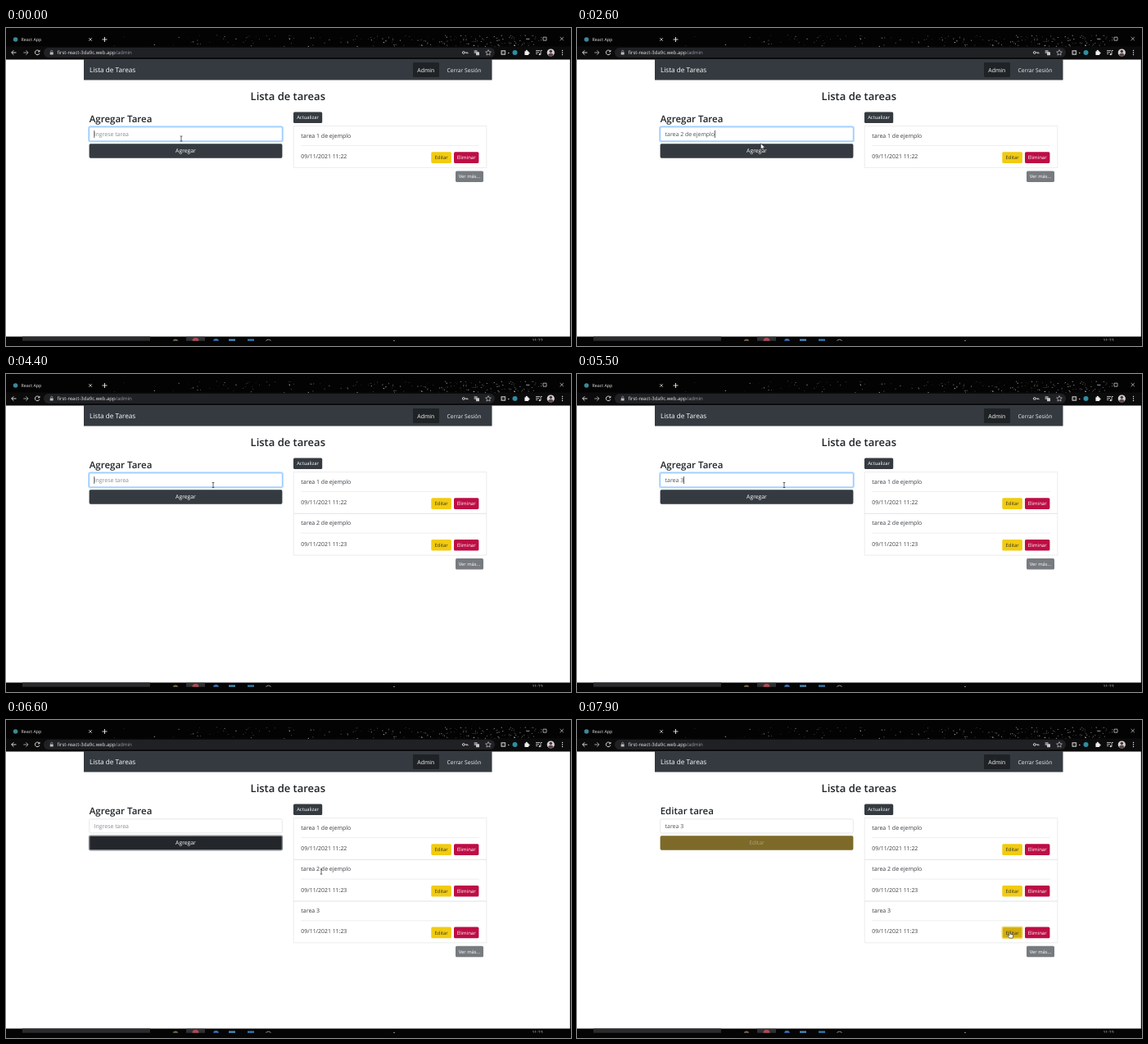
An HTML page for the animation above (8 s loop, 690 px wide and 388 px high).

```html
<!DOCTYPE html>
<html lang="es">
<head>
<meta charset="utf-8">
<title>Lista de tareas</title>
<style>
html, body { margin: 0; width: 100%; height: 100%; overflow: hidden; background: #fff; }
svg { display: block; width: 100%; height: 100%; }
text { font-family: "Open Sans", "Noto Sans", sans-serif; white-space: pre; text-rendering: geometricPrecision; }
</style>
</head>
<body>
<svg id="stage" viewBox="0 0 690 388"></svg>
<script>
const LOOP = 8000, ROW = 50.7;
const INK = '#373b40', DARK = '#343a40', PRESSED = '#23272b', LINE = '#e6e7e8';
const stage = document.getElementById('stage');

function add(tag, attrs, parent = stage) {
  const el = document.createElementNS('http://www.w3.org/2000/svg', tag);
  set(el, attrs);
  parent.appendChild(el);
  return el;
}
function set(el, attrs) {
  for (const k in attrs) el.setAttribute(k, attrs[k]);
}
const group = (parent = stage) => add('g', {}, parent);
const rect = (x, y, width, height, fill, rx = 0, parent = stage) =>
  add('rect', { x, y, width, height, fill, rx }, parent);
const dot = (cx, cy, r, fill, parent = stage) => add('circle', { cx, cy, r, fill }, parent);
const line = (d, stroke, w = 1, parent = stage) =>
  add('path', { d, stroke, 'stroke-width': w, fill: 'none' }, parent);
function label(x, y, str, size, fill, anchor = 'start', parent = stage, weight = 400) {
  const el = add('text', { x, y, fill, 'font-size': size, 'text-anchor': anchor, 'font-weight': weight }, parent);
  el.textContent = str;
  return el;
}
function button(x, y, w, h, str, size, fill, ink = '#fff', parent = stage) {
  const box = rect(x, y, w, h, fill, 1.6, parent);
  const text = label(x + w / 2, y + h / 2 + size * 0.36, str, size, ink, 'middle', parent);
  return { box, text };
}
const show = (el, on) => el.setAttribute('visibility', on ? 'visible' : 'hidden');

function drawBrowser() {
  rect(0, 0, 690, 38.3, '#030303');
  rect(0, 22.5, 690, 15.8, '#0b0b0c');
  rect(46, 24, 551, 12, '#202124', 6);

  // starry theme, denser to the right
  let seed = 7;
  const rnd = () => (seed = (seed * 16807) % 2147483647) / 2147483647;
  for (let i = 0; i < 210; i++) {
    const x = 130 + 525 * Math.pow(rnd(), 0.55), y = 8.5 + rnd() * 14, s = 0.4 + rnd() * 0.6;
    rect(x, y, s, s, '#fff').setAttribute('opacity', 0.3 + rnd() * 0.6);
  }

  dot(11.6, 14, 2.8, '#3f8796');
  label(18.5, 16, 'React App', 5.3, '#e4e4e4');
  line('M101.3 12.2l3.6 3.6m0-3.6l-3.6 3.6', '#ddd', 0.8);
  line('M117.5 14h6m-3-3v6', '#eee', 0.9);
  line('M635 13.3h4.5', '#ccc', 0.7);
  line('M656 11.2h4v4h-4z', '#ddd', 0.7);
  line('M676.6 11l4.2 4.2m0-4.2l-4.2 4.2', '#ddd', 0.7);

  line('M12.5 30H6.8m2.6-2.7L6.7 30l2.7 2.7', '#eee', 0.9);
  line('M21.3 30H27m-2.6-2.7L27.1 30l-2.7 2.7', '#aaa', 0.9);
  line('M40.6 28.3a2.8 2.8 0 1 0 .3 2.6m.1-4v2h-2', '#eee', 0.9);
  rect(53.7, 29.4, 4, 3.2, '#bbb', 0.4);
  line('M54.6 29.5v-1.1a1.1 1.1 0 0 1 2.2 0v1.1', '#bbb', 0.6);
  const url = label(62.5, 32.2, '', 6, '#e8eaed');
  add('tspan', {}, url).textContent = 'first-react-3da9c.web.app';
  add('tspan', { fill: '#9aa0a6' }, url).textContent = '/admin';

  add('circle', { cx: 558.8, cy: 30, r: 1.4, fill: 'none', stroke: '#ccc' });
  line('M560.3 30h3.7v1.3m-1.6-1.3v1.2', '#ccc', 0.9);
  rect(571.6, 27, 4, 4, '#888', 0.5);
  rect(574, 29.3, 4, 4, '#c8c8c8', 0.5);
  line('M589 26.6l1 2.2 2.4.3-1.8 1.6.5 2.4-2.1-1.2-2.1 1.2.5-2.4-1.8-1.6 2.4-.3z', '#ccc', 0.7);
  rect(604.3, 27, 6, 6, '#9a9a9a', 1);
  dot(607.3, 30, 1.7, '#222');
  dot(613.8, 30.5, 0.7, '#ddd');
  dot(621.5, 30, 3, '#2f8ea3');
  rect(633.4, 28.2, 4.8, 4.8, '#f0f0f0', 0.6);
  dot(635.8, 27.8, 1.1, '#f0f0f0');
  dot(638.5, 30.6, 1.1, '#f0f0f0');
  line('M647 27.5h5m-5 2h4m-4 2h2.4m3.6 1v-5h1.8', '#ddd', 0.8);
  dot(651.8, 32.2, 1.1, '#ddd');
  dot(665.3, 30, 4.6, '#d9d2d2');
  dot(665.3, 28.6, 1.8, '#453a3c');
  add('path', { d: 'M661.9 33a3.5 3 0 0 1 6.8 0a4.6 4.6 0 0 1-6.8 0z', fill: '#5b4548' });
  for (const y of [27.5, 30, 32.5]) dot(679.5, y, 0.7, '#eee');
}

function drawTaskbar() {
  rect(0, 376.5, 690, 11.5, '#050506');
  rect(20, 376.5, 156, 5.2, '#2b2b2d');
  const clip = add('clipPath', { id: 'bar' });
  rect(0, 376.5, 690, 5.3, '#000', 0, clip);
  const bar = add('g', { 'clip-path': 'url(#bar)' });
  rect(220, 376.5, 23, 6, '#303033', 0, bar);
  dot(207, 383, 3.4, '#7d6848', bar);
  dot(231.5, 382, 4, '#b04a55', bar);
  dot(256.5, 382.4, 3.4, '#3973b5', bar);
  rect(272, 379.5, 8, 5, '#4b91b8', 0, bar);
  rect(295, 379.5, 8, 5, '#337fb0', 0, bar);
  add('circle', { cx: 320.5, cy: 383.5, r: 3.4, fill: 'none', stroke: '#888' }, bar);
  rect(473, 381, 2, 1, '#aaa', 0, bar);
  return label(649, 382.6, '', 5.2, '#ddd', 'middle', bar);
}

function drawPage() {
  rect(95, 38.3, 498.5, 25.2, DARK);
  label(102, 54.2, 'Lista de Tareas', 8.2, '#fff');
  rect(497, 42, 32, 18, '#1f2326', 1);
  label(512.8, 53.6, 'Admin', 6.9, '#fff', 'middle');
  label(559.5, 53.6, 'Cerrar Sesión', 6.7, '#f0f0f0', 'middle');
  label(344.3, 88.3, 'Lista de tareas', 13, '#212529', 'middle', stage, 600);
  button(351, 102.4, 35.2, 13.6, 'Actualizar', 5.9, DARK);
}

function drawTask(i, name, time) {
  const g = add('g', { transform: `translate(0 ${i * ROW})` });
  line('M351.2 119.6V170.4H586.8V119.6Z', LINE, 0.8, g);
  line('M360 143.4H578', LINE, 0.7, g);
  label(360.3, 133.5, name, 7, INK, 'start', g);
  label(360.3, 159.1, time, 6.9, INK, 'start', g);
  const edit = button(519.3, 151.2, 24.6, 13.7, 'Editar', 5.9, '#f1cb12', '#3a3518', g);
  button(547, 151.2, 30.4, 13.7, 'Eliminar', 6, '#bd0d45', '#fff', g);
  return { g, edit };
}

rect(0, 0, 690, 388, '#fff');
drawPage();
drawBrowser();
const clock = drawTaskbar();
rect(688.8, 38, 1.2, 339, '#050506');

const heading = label(101.7, 114.7, '', 11.5, '#212529', 'start', stage, 600);
const glow = add('rect', { x: 101, y: 120.2, width: 237, height: 18.4, rx: 2, fill: 'none', stroke: '#bfdeff', 'stroke-width': 2 });
const field = add('rect', { x: 101.7, y: 120.9, width: 235.6, height: 17, rx: 1.5, fill: '#fff', 'stroke-width': 0.8 });
const entry = label(107.6, 132.4, '', 6.95, INK);
const caret = rect(107.5, 125, 0.7, 9, '#222');
const submit = button(101.6, 141.3, 235.8, 17.4, 'Agregar', 6.8, DARK);
const tasks = [
  drawTask(0, 'tarea 1 de ejemplo', '09/11/2021 11:22'),
  drawTask(1, 'tarea 2 de ejemplo', '09/11/2021 11:23'),
  drawTask(2, 'tarea 3', '09/11/2021 11:23')
];
const more = group();
button(549, 174.4, 34, 13.5, 'Ver más...', 5.8, '#777b7f', '#fff', more);

// pointer shapes, each with its hot spot at 0,0
const pointer = group();
const beam = line('M-1.3-3h2.6M-1.3 3h2.6M0-3v6', '#333', 0.75, pointer);
const arrow = add('path', { d: 'M0 0v7.2l1.7-1.5 1.2 2.6 1-.5-1.1-2.5h2.4z', fill: '#fff', stroke: '#111', 'stroke-width': 0.5 }, pointer);
const hand = add('path', {
  d: 'M-.7.2q.7-.7 1.3 0v3l3 .7q.8.3.7 1.2l-.6 3h-4L-2.9 5q.2-1 1.1-.6l1.1 1z',
  fill: '#fff', stroke: '#222', 'stroke-width': 0.6
}, pointer);

// time, x, y
const path = [
  [0, 214, 135], [2400, 214, 135], [3000, 254, 157], [3700, 254, 157],
  [4200, 253, 135.5], [5800, 253, 135.5], [6000, 256, 151], [6300, 256, 151],
  [6600, 385, 185], [7500, 528.5, 258], [LOOP, 528.5, 258]
];
function pointerAt(t) {
  const i = path.findIndex((p, n) => n && t <= p[0]);
  const [t0, x0, y0] = path[i - 1], [t1, x1, y1] = path[i];
  const u = (t - t0) / (t1 - t0), e = u * u * (3 - 2 * u);
  return [x0 + (x1 - x0) * e, y0 + (y1 - y0) * e];
}
const inside = (x, y, l, t, r, b) => x >= l && x <= r && y >= t && y <= b;

function typed(t) {
  const keys = (str, from) => str.slice(0, Math.max(0, Math.floor((t - from) / 100) + 1));
  if (t < 3500) return keys('tarea 2 de ejemplo', 500);
  if (t < 6400) return keys('tarea 3', 4900);
  return t < 7900 ? '' : 'tarea 3';
}
function caretOn(t) {
  const start = t < 500 ? 0 : t < 2200 ? t : t < 3200 ? 2200 : t < 4900 ? 4200 : t < 5500 ? t : 5500;
  return (t - start) % 1000 < 500;
}

function render(t) {
  const editing = t >= 7900;
  const focused = t < 3200 || (t >= 4200 && t < 6100);
  const pressed = (t >= 3200 && t < 4200) || (t >= 6100 && t < 7700);
  const [x, y] = pointerAt(t);
  const overSubmit = inside(x, y, 101, 141, 338, 159);
  const overEdit = inside(x, y, 519, 252, 544, 267);
  const overText = inside(x, y, 101, 120, 338, 138.5) || inside(x, y, 360, 177, 420, 188);

  clock.textContent = t < 1000 ? '11:22' : '11:23';
  heading.textContent = editing ? 'Editar tarea' : 'Agregar Tarea';

  const str = typed(t);
  entry.textContent = str || 'Ingrese tarea';
  entry.setAttribute('fill', str ? '#495057' : '#858b91');
  show(glow, focused);
  field.setAttribute('stroke', focused ? '#80bdff' : '#e0e2e4');
  show(caret, focused && caretOn(t));
  caret.setAttribute('x', 107.5 + (str ? entry.getComputedTextLength() : 0));

  set(submit.box, {
    fill: editing ? '#7d6a28' : pressed || overSubmit ? PRESSED : DARK,
    stroke: pressed ? '#85898d' : 'none',
    'stroke-width': 1.5
  });
  submit.text.textContent = editing ? 'Editar' : 'Agregar';
  submit.text.setAttribute('fill', editing ? '#aaa07a' : '#fff');

  const count = t < 3500 ? 1 : t < 6400 ? 2 : 3;
  tasks.forEach((task, i) => show(task.g, i < count));
  more.setAttribute('transform', `translate(0 ${(count - 1) * ROW})`);
  set(tasks[2].edit.box, {
    fill: overEdit ? '#d4ae0b' : '#f1cb12',
    stroke: t >= 7700 ? '#ecd668' : 'none',
    'stroke-width': 1.5
  });

  pointer.setAttribute('transform', `translate(${x} ${y})`);
  const overButton = overSubmit || overEdit;
  show(hand, overButton);
  show(beam, !overButton && overText);
  show(arrow, !overButton && !overText);
}

const start = performance.now();
function tick() {
  const t = (performance.now() - start) % LOOP;
  render(Math.floor(t / 100) * 100);
  requestAnimationFrame(tick);
}
tick();
</script>
</body>
</html>
```
